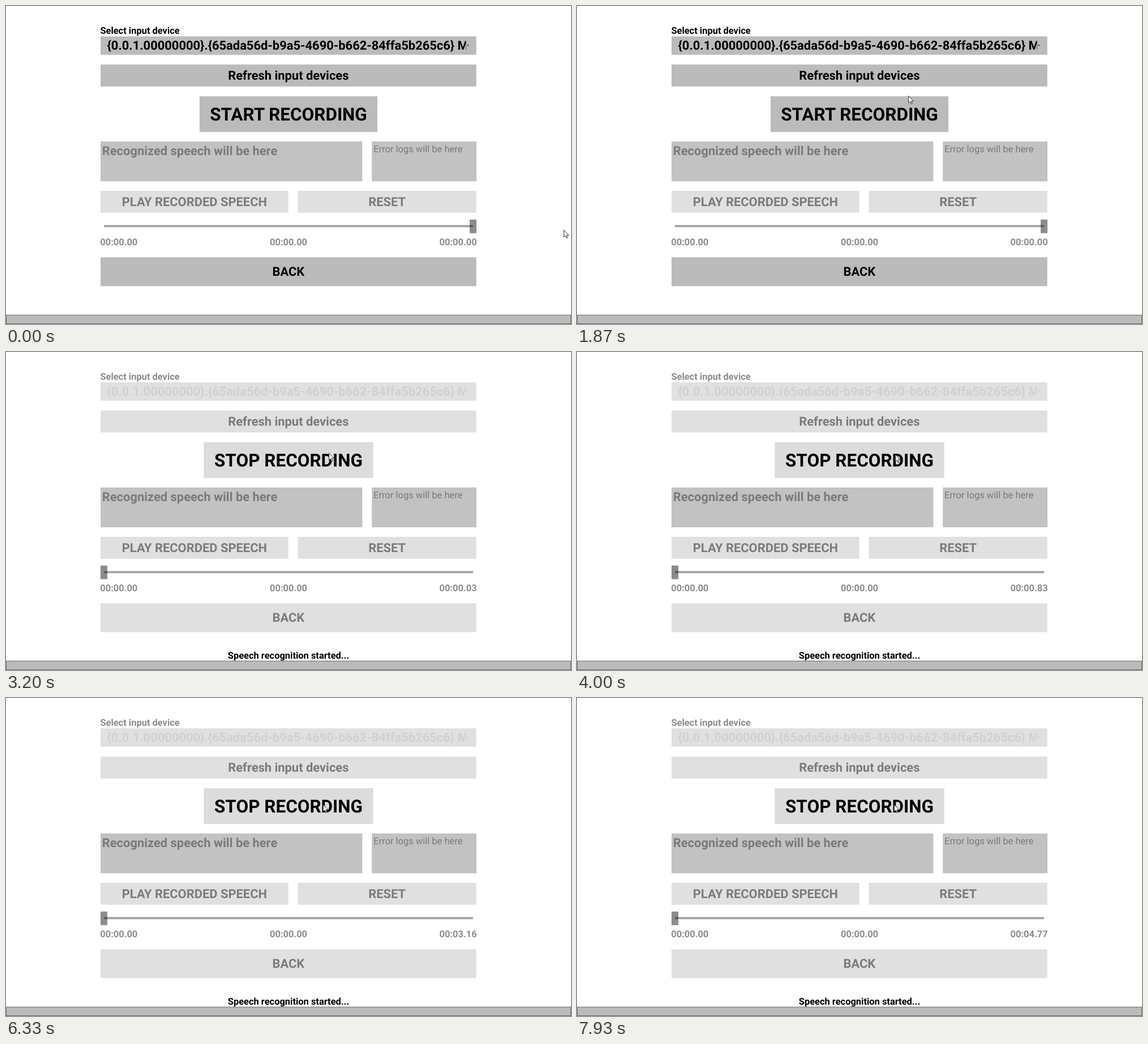
Animation of 998x561 px, one loop 8 s. Source, as an HTML page:

```html
<!DOCTYPE html>
<html lang="en">
<head>
<meta charset="utf-8">
<title>Speech recorder</title>
<style>
  html, body { margin: 0; width: 100%; height: 100%; overflow: hidden; background: #fff; }
  svg { display: block; width: 998px; height: 561px; }
  text { font-family: Roboto, sans-serif; font-weight: 700; text-rendering: geometricPrecision; white-space: pre; }
</style>
</head>
<body>
<svg id="stage" viewBox="0 0 998 561" xmlns="http://www.w3.org/2000/svg">
  <defs><clipPath id="combo"><rect x="167" y="53" width="645.5" height="33"/></clipPath></defs>
</svg>
<script>
const LOOP = 8000, FPS = 15;
const PRESS = 3000, RECORD = 3200;
const NORMAL = '#bbbbbb', HOVER = '#dcdcdc', PRESSED = '#a8a8a8', OFF = '#e0e0e0', OFF_TEXT = '#7b7b7b';
const MID = 21.9, SMALL = 16.45, BIG = 31.5;

const stage = document.getElementById('stage');

function add(tag, attrs, content) {
  const el = document.createElementNS(stage.namespaceURI, tag);
  set(el, attrs);
  if (content) el.textContent = content;
  return stage.appendChild(el);
}

function set(el, attrs) {
  for (const k in attrs) el.setAttribute(k, attrs[k]);
}

function box(x, y, right, bottom, fill, r = 1.2) {
  return add('rect', { x, y, width: right - x, height: bottom - y, rx: r, fill });
}

function label(content, x, y, size, fill, anchor = 'start') {
  return add('text', { x, y, fill, 'font-size': size, 'text-anchor': anchor }, content);
}

function button(content, x, y, right, bottom, size = MID) {
  const mid = (y + bottom) / 2 + size * 0.3415;
  return {
    face: box(x, y, right, bottom, OFF),
    text: label(content, (x + right) / 2, mid, size, OFF_TEXT, 'middle')
  };
}

function enable(b, on) {
  set(b.face, { fill: on ? NORMAL : OFF });
  set(b.text, { fill: on ? '#000' : OFF_TEXT });
}

// Device picker
const title = label('Select input device', 166.4, 49, SMALL, '#000');
const combo = box(167, 53.5, 830.7, 86, NORMAL);
const device = label('{0.0.1.00000000}.{65ada56d-b9a5-4690-b662-84ffa5b265c6} Microphone', 178.6, 77.2, MID, '#000');
set(device, { 'clip-path': 'url(#combo)' });
const arrow = add('path', { d: 'M813.9 68.5h4l-2 2.2z' });

const refresh = button('Refresh input devices', 167, 103.3, 830.7, 142);
const record = button('START RECORDING', 342, 159.3, 656, 222.3, BIG);
set(record.text, { fill: '#000' });

// Output panels
box(167, 239, 629.3, 309.2, '#c2c2c2', 0);
label('Recognized speech will be here', 169.8, 262.8, MID, '#7a7a7a');
box(646.2, 239, 831, 309.2, '#c2c2c2', 0);
set(label('Error logs will be here', 649, 258, 16.5, '#7a7a7a'), { 'font-weight': 400, style: 'font-weight:400' });

button('PLAY RECORDED SPEECH', 167, 326, 498.7, 364.8);
button('RESET', 515.5, 326, 830.7, 364.8);

// Slider and times
box(173, 386.4, 825, 390.2, '#a2a2a2', 0);
const thumb = box(819, 376.7, 831, 400.8, '#000', 0.5);
set(thumb, { 'fill-opacity': 0.45 });
label('00:00.00', 166.3, 421.7, SMALL, '#8c8c8c');
label('00:00.00', 499, 421.7, SMALL, '#8c8c8c', 'middle');
const total = label('00:00.00', 831.6, 421.7, SMALL, '#8c8c8c', 'end');

const back = button('BACK', 167, 443.2, 830.7, 494.2);

const status = label('Speech recognition started...', 499, 540.8, SMALL, '#000', 'middle');
add('rect', { x: 0.5, y: 545.2, width: 997, height: 15.3, fill: NORMAL, stroke: '#666' });

const cursor = add('path', {
  d: 'M0 0V12.4L2.8 9.9 4.8 14.4 6.7 13.6 4.7 9.2H8.5Z',
  fill: '#fff', stroke: '#1c1c1c', 'stroke-width': 0.9, 'stroke-linejoin': 'round'
});

// Each key: time, then values
const path = [
  [0, 985.5, 395.2], [530, 890.6, 93.6], [670, 890.6, 93.6], [1130, 870.7, 195.4],
  [1530, 870.7, 195.4], [1870, 585.5, 158.6], [2130, 570.6, 178.4], [3130, 570.6, 178.4],
  [4000, 562.4, 180.8], [4870, 560.8, 187.9], [5130, 560.3, 188], [LOOP, 560.3, 188]
];
const clock = [[RECORD, 0.03], [4000, 0.834], [5400, 2.224], [6333, 3.163], [7933, 4.773], [LOOP, 4.84]];

const smooth = u => u * u * (3 - 2 * u);

function sample(keys, t, ease = u => u) {
  let i = 1;
  while (i < keys.length - 1 && t > keys[i][0]) i++;
  const a = keys[i - 1], b = keys[i];
  const u = ease(Math.min(1, Math.max(0, (t - a[0]) / (b[0] - a[0]))));
  return a.slice(1).map((v, k) => v + (b[k + 1] - v) * u);
}

function format(s) {
  const pad = n => String(n).padStart(2, '0');
  const c = Math.floor(s * 100 + 0.001);
  return pad(Math.floor(c / 6000)) + ':' + pad(Math.floor(c / 100) % 60) + '.' + pad(c % 100);
}

function render(ms) {
  const t = Math.floor((ms + 4) * FPS / 1000) * 1000 / FPS;
  const on = t >= RECORD - 1;
  const [x, y] = sample(path, t, smooth);
  const over = y > 159.3 && y < 222 && x > 342 && x < 656;

  set(title, { fill: on ? '#8c8c8c' : '#000' });
  set(combo, { fill: on ? OFF : NORMAL });
  set(device, { fill: on ? '#d1d1d1' : '#000' });
  set(arrow, { fill: on ? '#c8c8c8' : '#333' });
  enable(refresh, !on);
  enable(back, !on);

  set(record.face, {
    x: on ? 349.3 : 342,
    width: on ? 299.3 : 314,
    fill: !on && t >= PRESS - 1 ? PRESSED : over ? HOVER : NORMAL
  });
  record.text.textContent = on ? 'STOP RECORDING' : 'START RECORDING';

  set(thumb, { x: on ? 167 : 819 });
  total.textContent = format(on ? sample(clock, t)[0] : 0);
  set(status, { visibility: on ? 'visible' : 'hidden' });
  set(cursor, { transform: `translate(${x} ${y})` });
}

const start = performance.now();
function loop() {
  render((performance.now() - start) % LOOP);
  requestAnimationFrame(loop);
}
loop();
</script>
</body>
</html>
```
